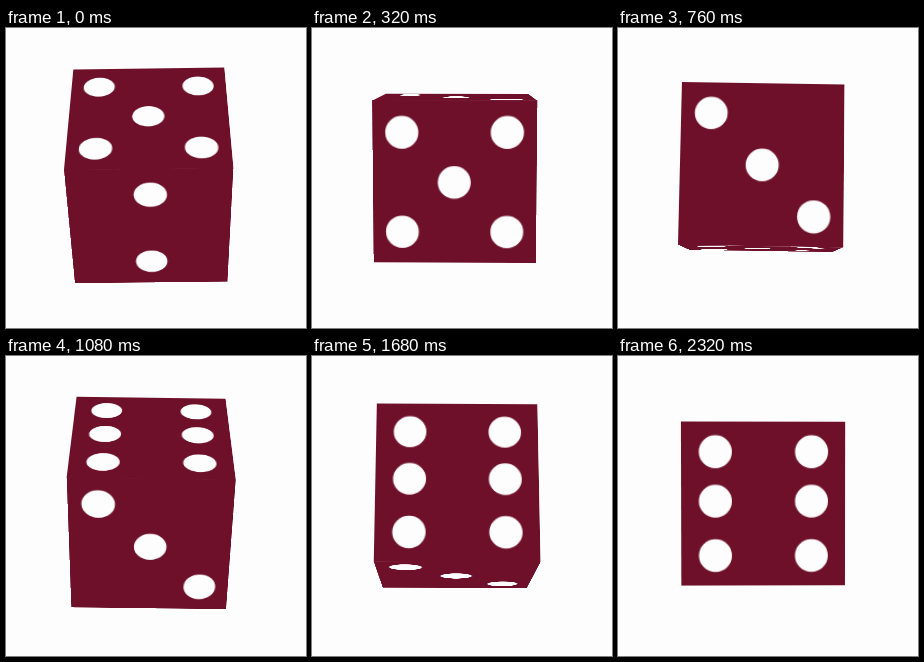
These frames come from a looping animation (300x300 px, 2.36 s). An HTML page without scripts:

```html
<!DOCTYPE html>
<html lang="en">
<head>
<meta charset="utf-8">
<title>Rolling die</title>
<style>
  @property --tick {
    syntax: "<number>";
    inherits: false;
    initial-value: 0;
  }

  html, body {
    margin: 0;
    width: 100%;
    height: 100%;
    overflow: hidden;
    background: #fdfdfd;
  }

  .stage {
    position: relative;
    width: 300px;
    height: 300px;
    perspective: 1025px;
    perspective-origin: 144px 144.5px;
  }

  .drift, .die {
    position: absolute;
    transform-style: preserve-3d;
  }

  .drift {
    left: 144px;
    top: 144.5px;
    animation: settle 2360ms linear infinite;
  }

  /* The roll slows down as --left falls from 1 to 0. */
  .die {
    --left: calc((58 - max(var(--tick), 1)) / 57);
    --gone: calc(1 - var(--left));
    --square: calc(var(--left) * var(--left));
    --cube: calc(var(--gone) * var(--gone) * var(--gone));
    --ease: calc(1 - var(--cube) * var(--square) * (3 + 4.4 * var(--left)));
    --roll: calc(230deg * var(--square) * var(--ease) - 2deg);
    transform: rotateX(var(--roll)) rotateY(0.9deg);
    animation: roll 2360ms steps(59) infinite;
  }

  /* Faces overlap a little at the edges so that no seam shows. */
  .face {
    position: absolute;
    left: -76.2px;
    top: -76.2px;
    width: 152.4px;
    height: 152.4px;
    background: #6e1029;
    fill: #fdfdfd;
    backface-visibility: hidden;
    transform: rotateX(var(--turn)) translateZ(75.6px);
  }

  .six { --turn: 0deg; }
  .three { --turn: -90deg; }
  .five { --turn: -180deg; }
  .two { --turn: 90deg; }

  circle { r: 15.3px; }

  @keyframes roll {
    from { --tick: 0; }
    to { --tick: 59; }
  }

  @keyframes settle {
    0%, 3% { transform: translateY(2.2px); }
    13%, 100% { transform: translateY(0); }
  }
</style>
</head>
<body>
<div class="stage">
  <div class="drift">
    <div class="die">
      <svg class="face six" viewBox="-76.2 -76.2 152.4 152.4">
        <circle cx="-44.5" cy="-48.5"/>
        <circle cx="44.5" cy="-48.5"/>
        <circle cx="-44.5" cy="-2.7"/>
        <circle cx="44.5" cy="-2.7"/>
        <circle cx="-44.5" cy="47.8"/>
        <circle cx="44.5" cy="47.8"/>
      </svg>
      <svg class="face three" viewBox="-76.2 -76.2 152.4 152.4">
        <circle cx="-48.2" cy="-47.5"/>
        <circle cx="0" cy="0.5"/>
        <circle cx="48.2" cy="48"/>
      </svg>
      <svg class="face five" viewBox="-76.2 -76.2 152.4 152.4">
        <circle cx="-49" cy="-46.5"/>
        <circle cx="48.3" cy="-46.5"/>
        <circle cx="-0.6" cy="0"/>
        <circle cx="-49" cy="46.5"/>
        <circle cx="48.3" cy="46.5"/>
      </svg>
      <svg class="face two" viewBox="-76.2 -76.2 152.4 152.4">
        <circle cx="0.8" cy="-44"/>
        <circle cx="0.8" cy="45"/>
      </svg>
    </div>
  </div>
</div>
</body>
</html>
```
